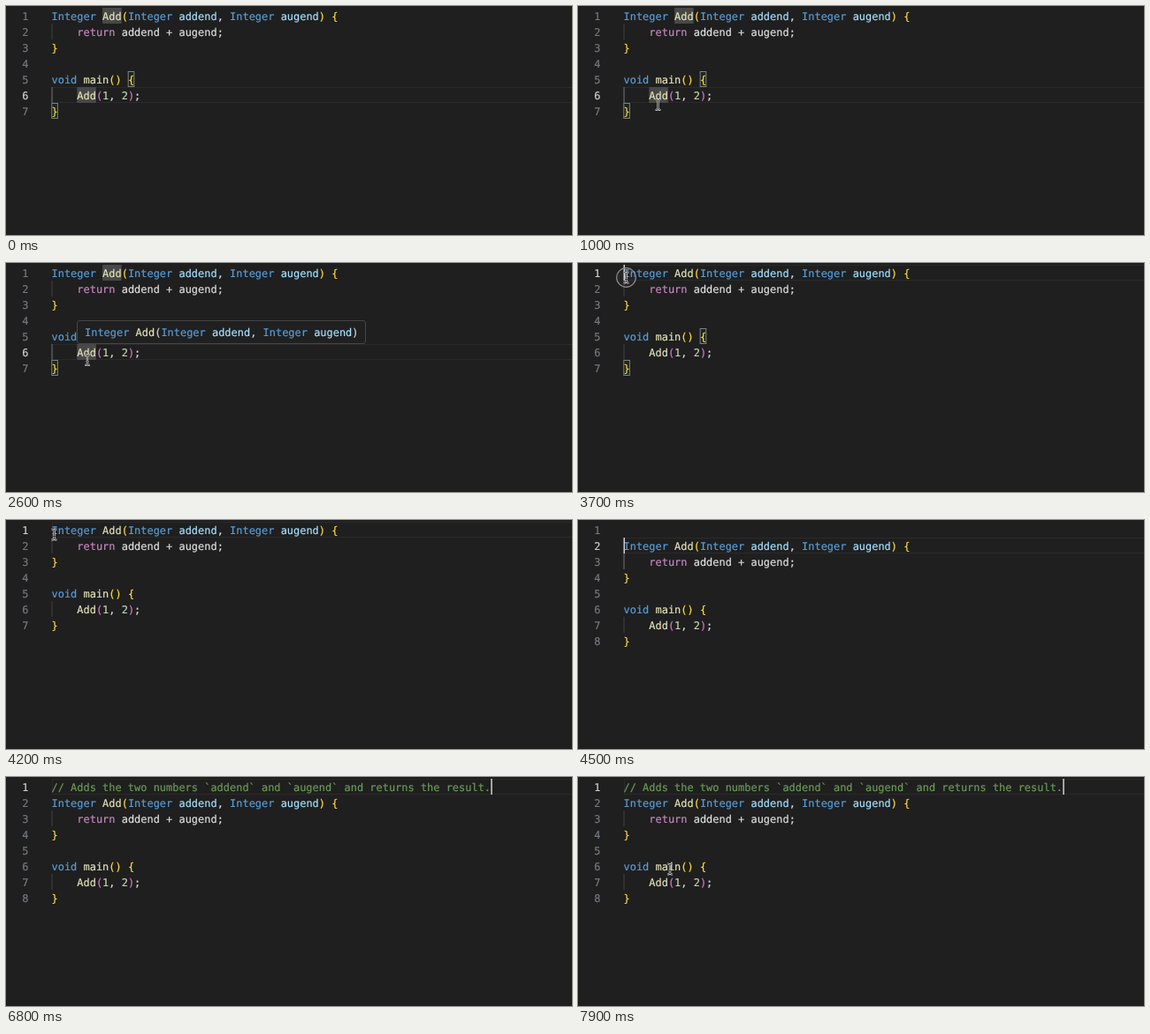
Animation of 640 by 260 pixels, one loop 8000 ms. Source, as an HTML page:

```html
<!DOCTYPE html>
<html lang="en">
<head>
<meta charset="utf-8">
<title>Editor hover comment</title>
<style>
  html, body { margin: 0; width: 100%; height: 100%; overflow: hidden; background: #1f1f1f; }
  svg { display: block; width: 640px; height: 260px; }
  text { font: 11.96px "DejaVu Sans Mono", "Noto Sans Mono", monospace; white-space: pre; text-rendering: geometricPrecision; }
  text, tspan { fill: currentColor; stroke: currentColor; stroke-width: .2px; }
</style>
</head>
<body>
<svg id="stage" viewBox="0 0 640 260"></svg>
<script>
const LOOP = 8000, CHAR = 7.2, LEFT = 51.5, LINE = 18, TOP = 2;
const HOVER_AT = 1200, CLICK_AT = 3600, ENTER_AT = 4500, UP_AT = 5000, PASTE_AT = 5800, POINTER_BACK = 7000;

const signature = 'Integer Add(Integer addend, Integer augend)';
const comment = '// Adds the two numbers `addend` and `augend` and returns the result.';
const code = [signature + ' {', '    return addend + augend;', '}', '', 'void main() {', '    Add(1, 2);', '}'];

const carets = [
  { at: 0, line: 6, col: 4, blinkFrom: -900 },
  { at: CLICK_AT, line: 1, col: 0 },
  { at: ENTER_AT, line: 2, col: 0 },
  { at: UP_AT, line: 1, col: 0 },
  { at: PASTE_AT, line: 1, col: comment.length },
];

// Pointer keys: time, x, y
const path = [
  [100, 150, 247], [700, 95, 120], [900, 90.5, 112], [1900, 90.5, 112], [2100, 92, 110],
  [2700, 92, 110], [3400, 54.5, 16.5], [POINTER_BACK, 54.5, 16.5], [7700, 101, 103], [7900, 104, 104.5],
];

const tokenColors = {
  comment: '#6a9955', type: '#569cd6', flow: '#c586c0', name: '#e2e2b8',
  param: '#a4e0fe', number: '#c4d8b4',
};
const tokens = /(?<comment>\/\/.*)|(?<type>Integer|void)|(?<flow>return)|(?<name>Add|main)|(?<param>(?<=Integer )a\w+)|(?<number>\d)|(?<bracket>[(){}])/g;

const colX = col => LEFT + col * CHAR;
const lineY = line => TOP + (line - 1) * LINE;
const rect = (x, y, w, h, fill, extra = '') =>
  `<rect x="${x}" y="${y}" width="${w}" height="${h}" fill="${fill}" ${extra}/>`;
const text = (x, y, color, content) => `<text x="${x}" y="${y}" color="${color}">${content}</text>`;

function highlight(line, bracketColor) {
  return line.replace(tokens, (match, ...rest) => {
    const kind = Object.entries(rest.at(-1)).find(([, value]) => value)[0];
    return `<tspan color="${tokenColors[kind] || bracketColor}">${match}</tspan>`;
  });
}

function pointerAt(t) {
  let i = path.findIndex(key => key[0] > t);
  if (i < 0) return path.at(-1).slice(1);
  i = Math.max(i, 1);
  const [t0, x0, y0] = path[i - 1], [t1, x1, y1] = path[i];
  const p = Math.max(0, (t - t0) / (t1 - t0)), ease = p * p * (3 - 2 * p);
  return [x0 + (x1 - x0) * ease, y0 + (y1 - y0) * ease];
}

function drawPointer(t) {
  const [x, y] = pointerAt(t);
  const ring = t >= CLICK_AT && t < 3900
    ? `<circle cx="${x}" cy="${y}" r="10.8" fill="#888" fill-opacity=".06" stroke="#8c8c8c" stroke-width="1.2"/>` : '';
  const beam = 'M-3-6Q0-6 0-4Q0-6 3-6M0-4V4M-3 6Q0 6 0 4Q0 6 3 6M-1.5 2H1.5';
  return `${ring}<g transform="translate(${x} ${y})" fill="none">
    <path d="${beam}" stroke="#d8d8d8" stroke-width="2.2"/><path d="${beam}" stroke="#222" stroke-width=".8"/></g>`;
}

function drawHover() {
  return rect(80.5, 65.5, 326, 26, '#202020', 'rx="2.5" stroke="#454545"') +
    text(89, 83, '#d4d4d4', highlight(signature, '#d4d4d4'));
}

function render(t) {
  const caret = carets.findLast(c => c.at <= t);
  const lines = t < ENTER_AT ? code : [t < PASTE_AT ? '' : comment, ...code];
  const shift = lines.length - code.length;
  const caretY = lineY(caret.line);
  let out = rect(0, 0, 640, 260, '#1f1f1f');

  out += rect(LEFT + 1, caretY + .5, 600, LINE - 1, 'none', 'stroke="#2a2a2a"');
  if (t < CLICK_AT) {
    out += rect(colX(8), lineY(1), 3 * CHAR, LINE, '#484848') + rect(colX(4), lineY(6), 3 * CHAR, LINE, '#484848');
  }
  if (t < 3800) {
    for (const [line, col] of [[5, 12], [7, 0]]) {
      out += rect(colX(col) + .3, lineY(line) + .5, CHAR - .6, LINE - 1, '#1d261d', 'stroke="#808080"');
    }
  }
  for (const line of [2, 6]) {
    const active = caret.line === line || (shift && caret.line === line + shift - 1);
    out += rect(51.5, lineY(line + shift), 1, LINE, active ? '#707070' : '#404040');
  }

  lines.forEach((line, i) => {
    const y = lineY(i + 1) + 13.5;
    out += text(18.3, y, i + 1 === caret.line ? '#d0d0d0' : '#747880', i + 1);
    out += text(LEFT, y, '#dedede', highlight(line, line.startsWith(' ') ? '#da70d6' : '#ffdc38'));
  });

  const blinkFrom = caret.blinkFrom ?? caret.at;
  if ((t - blinkFrom) % 1000 < 500) out += rect(colX(caret.col), caretY, 1.5, LINE, '#d0d0d0');
  if (t >= HOVER_AT && t < CLICK_AT) out += drawHover();
  if ((t >= 100 && t < ENTER_AT) || t >= POINTER_BACK) out += drawPointer(t);
  return out;
}

const stage = document.getElementById('stage');
const start = performance.now();
function tick() {
  stage.innerHTML = render((performance.now() - start) % LOOP);
  requestAnimationFrame(tick);
}
tick();
</script>
</body>
</html>
```
